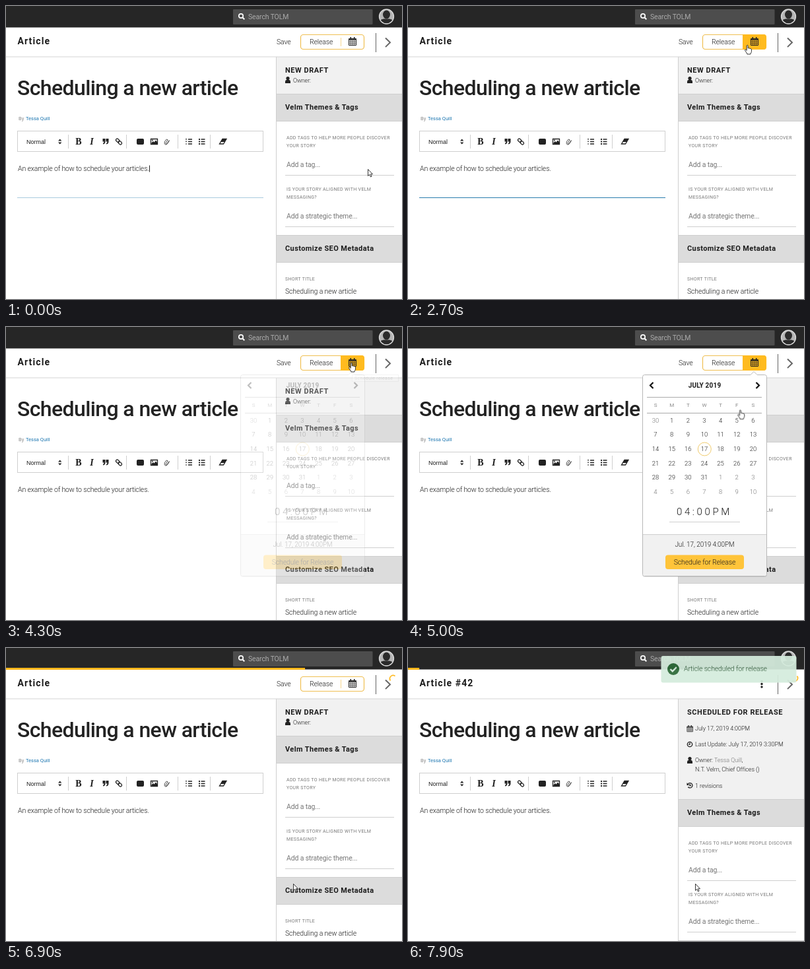
An HTML page that plays this animation: 600 px wide and 444 px high, repeating every 8 s.

```html
<!DOCTYPE html>
<html lang="en">
<head>
<meta charset="utf-8">
<title>Scheduling an article</title>
<style>
html, body { margin: 0; width: 100%; height: 100%; overflow: hidden; background: #fff; }
svg { display: block; width: 100%; height: 100%; }
text { font: 300 10.5px Roboto, "Open Sans", sans-serif; letter-spacing: -.145px; fill: #1c1c1c; white-space: pre; }
.title { font-size: 32px; font-weight: 500; letter-spacing: -.62px; fill: #222; }
.page { font-size: 14px; font-weight: 700; letter-spacing: 1.1px; }
.head { font-size: 11px; font-weight: 700; letter-spacing: .4px; }
.state { font-size: 11px; font-weight: 700; letter-spacing: .55px; }
.label { font-size: 7px; font-weight: 400; letter-spacing: .33px; fill: #777; }
.hint { font-weight: 400; fill: #777; }
.meta { font-size: 9px; letter-spacing: -.08px; }
.by { font-size: 7.5px; font-weight: 400; letter-spacing: 0; fill: #888; }
.mid { text-anchor: middle; }
.day { font-size: 9.5px; letter-spacing: 0; fill: #222; }
.out { fill: #777; }
.week { font-size: 8px; font-weight: 400; letter-spacing: 0; fill: #888; }
.month { font-size: 10px; font-weight: 700; letter-spacing: .2px; }
.time { font-size: 15px; letter-spacing: 3.6px; }
.date { font-size: 10px; letter-spacing: -.08px; }
.serif { font: 700 14px "Liberation Serif", serif; letter-spacing: 0; }
.slant { font-style: italic; }
.pick { font: 9px "Liberation Sans", sans-serif; letter-spacing: 0; }
.line { stroke: #cfcfcf; }
.ink { fill: none; stroke: #222; stroke-width: 1.3; }

/* 1% = 80 ms */
.fade { animation: 8s linear infinite; }
.cut { animation: 8s step-end infinite; }
.focus { animation-name: focus; }
.caret { animation-name: caret; }
.hover { animation-name: hover; }
.tip { animation-name: tip; }
.pop { animation-name: pop; }
.go { animation-name: go; }
.bar { animation-name: bar; }
.toast { animation-name: toast; }
.cursor { animation: move 8s ease-in-out infinite; }
.arrow { animation-name: arrow; }
.beam { animation-name: beam; }
.hand { animation-name: hand; }
.saved { animation-name: saved; }
.unsaved { animation-name: unsaved; }
.done { animation-name: done; }
.draft { animation-name: draft; }
.shift { animation-name: shift; }
.busy { animation-name: busy; }
.spin { animation: spin .4s linear infinite; transform-origin: 586px 46px; }

@keyframes focus { 0% { opacity: .4 } 6%, 51.2% { opacity: 1 } 53%, 100% { opacity: 0 } }
@keyframes caret {
  0%, 13.125%, 26.375%, 39.625% { visibility: visible }
  6.5%, 19.75%, 33%, 46.25%, 100% { visibility: hidden }
}
@keyframes hover { 0%, 21.25% { opacity: 0 } 23.75%, 74.4% { opacity: 1 } 76.25%, 100% { opacity: 0 } }
@keyframes tip { 0%, 38.75% { opacity: 0 } 41.25%, 52% { opacity: 1 } 54.2%, 100% { opacity: 0 } }
@keyframes pop { 0%, 52.2% { opacity: 0 } 58.125%, 78.75% { opacity: 1 } 82.5%, 100% { opacity: 0 } }
@keyframes go { 0%, 70% { fill: #ffc43a } 72.5%, 100% { fill: #ffbb1f } }
@keyframes bar {
  0%, 80% { transform: scaleX(0) }
  83.75% { transform: scaleX(.4) }
  87.5% { transform: scaleX(.93) }
  87.6%, 91.25% { transform: scaleX(0) }
  95% { transform: scaleX(.0933) }
  96.8% { transform: scaleX(.15) }
  96.9% { transform: scaleX(0) }
  98.75% { transform: scaleX(.0283) }
  100% { transform: scaleX(.05) }
}
@keyframes toast { 0%, 88.75% { opacity: 0 } 93.75%, 100% { opacity: .93 } }
@keyframes move {
  0%, 2% { transform: translate(548px, 247px) }
  11.5%, 12.5% { transform: translate(46px, 120px); animation-timing-function: ease-in }
  16.25% { transform: translate(276px, 115px); animation-timing-function: linear }
  21.25% { transform: translate(478px, 64px); animation-timing-function: ease-out }
  25%, 35% { transform: translate(514px, 59px) }
  40%, 55% { transform: translate(523px, 54px) }
  61.9% { transform: translate(504px, 123px) }
  70% { transform: translate(440px, 352px) }
  73%, 82% { transform: translate(437px, 355px) }
  82.5%, 100% { transform: translate(435px, 357px) }
}
@keyframes arrow {
  0%, 18%, 82.5%, 100% { visibility: visible }
  7.5%, 21% { visibility: hidden }
}
@keyframes beam { 0%, 18%, 100% { visibility: hidden } 7.5% { visibility: visible } }
@keyframes hand { 0%, 82.5%, 100% { visibility: hidden } 21% { visibility: visible } }
@keyframes saved { 0% { visibility: hidden } 88.75%, 100% { visibility: visible } }
@keyframes unsaved { 0% { visibility: visible } 88.75%, 100% { visibility: hidden } }
@keyframes done { 0% { visibility: hidden } 96.9%, 100% { visibility: visible } }
@keyframes draft { 0% { visibility: visible } 96.9%, 100% { visibility: hidden } }
@keyframes shift { 0% { transform: none } 96.9%, 100% { transform: translateY(96px) } }
@keyframes busy { 0% { visibility: hidden } 80%, 100% { visibility: visible } }
@keyframes spin { to { transform: rotate(360deg) } }
</style>
</head>
<body>
<svg viewBox="0 0 600 444" xmlns="http://www.w3.org/2000/svg">
  <defs>
    <g id="cal" fill="none" stroke="#222">
      <path d="M.5 2.5h11v10H.5z"/>
      <path d="M0 4h12" stroke-width="1.6"/>
      <path d="M1 7.2h10M1 9.9h10M3.3 5v7.500M6 5v7.500M8.700 5v7.500" stroke-width=".7"/>
      <path d="M3.300 0v3.500M8.700 0v3.500" stroke-width="1.600"/>
    </g>
    <g id="user">
      <circle cx="4" cy="2.6" r="2.6"/>
      <path d="M0 10V7.5Q0 5 2 5h4q2 0 2 2.5V10z"/>
    </g>
    <clipPath id="face"><circle cx="576.5" cy="16" r="11"/></clipPath>
  </defs>
  <rect width="600" height="444" fill="#fff"/>

  <!-- main column -->
  <text class="title" x="17" y="134.5">Scheduling a new article</text>
  <text class="by" x="19" y="173">By <tspan x="30" fill="#1b75b0">Tessa Quill</tspan></text>
  <rect x="17.5" y="189.5" width="372" height="31" fill="none" class="line"/>
  <text class="pick" x="31" y="209">Normal</text>
  <path d="M79 204.5l2.7-3 2.7 3zM79 206.5l2.7 3 2.7-3z" fill="#222"/>
  <path class="line" d="M94.5 195v21M182.5 195v21M260.5 195v21M309.5 195v21"/>
  <text class="serif mid" x="110" y="210">B</text>
  <text class="serif slant mid" x="130" y="210">I</text>
  <path d="M146.5 201h4v4q0 4-3.5 4.5v-1.5q1.5-.5 1.5-2.5h-2zM151.5 201h4v4q0 4-3.5 4.5v-1.5q1.5-.5 1.5-2.5h-2z" fill="#222"/>
  <g class="ink" transform="rotate(45 171 205.5)">
    <rect x="165.5" y="203.5" width="6" height="4" rx="2"/>
    <rect x="170.5" y="203.5" width="6" height="4" rx="2"/>
  </g>
  <rect x="198" y="201" width="11" height="9" rx="2" fill="#222"/>
  <path class="ink" d="M219.5 201.5h10v8h-10z"/>
  <path d="M220.5 209v-2l2.5-2 1.5 1.5 2.5-3 2 2.5v3z" fill="#222"/>
  <circle cx="222" cy="203.5" r="1" fill="#222"/>
  <path d="M247.5 204l-4 4.6q-.8.8-1.500 0-.6-.8 0-1.500l3.500-4.100q-1.800-1.800-3.200 0l-1.900 2.400q-1.400 2.400.2 4 1.800 1.200 3.400-.6l3.800-4.500" transform="rotate(-8 244 205.5)" fill="none" stroke="#444" stroke-width=".9"/>
  <path d="M276 202h6M276 205.5h6M276 209h6M295.5 202h6M295.5 205.5h6M295.5 209h6" stroke="#222" stroke-width="1.6"/>
  <path d="M273 200.5v3M272 205.5h2M272 209h2" stroke="#222"/>
  <path d="M292 202h2M292 205.5h2M292 209h2" stroke="#222" stroke-width="2"/>
  <path class="ink" d="M328 201.5h6l-4.5 7.5h-6z"/>
  <path d="M328 201.5h6l-2.7 4.5h-6z" fill="#222"/>
  <text x="18" y="250">An example of how to schedule your articles.</text>
  <path class="cut caret" d="M217.5 241.5v10" stroke="#222"/>
  <path class="fade focus" d="M17 290.5h373" stroke="#2a7cad"/>

  <!-- sidebar -->
  <rect x="410" y="77" width="190" height="367" fill="#f1f1f1"/>
  <g class="cut draft">
    <text class="state" x="423" y="101">NEW DRAFT</text>
    <use href="#user" x="423" y="107" fill="#222"/>
    <text class="meta" x="435" y="115.5">Owner:</text>
  </g>
  <g class="cut done">
    <text class="state" x="423" y="101">SCHEDULED FOR RELEASE</text>
    <use href="#cal" transform="translate(422.5 117) scale(.78)"/>
    <text class="meta" x="435" y="125">July 17, 2019 4:00PM</text>
    <circle class="ink" cx="427" cy="146" r="3.7"/>
    <path class="ink" d="M427 143.5v2.7h-2"/>
    <text class="meta" x="435" y="149">Last Update: July 17, 2019 3:30PM</text>
    <use href="#user" x="423" y="165" fill="#222"/>
    <text class="meta" x="435" y="173">Owner: <tspan fill="#777">Tessa Quill</tspan>,</text>
    <text class="meta" x="435" y="187">N.T. Velm, Chief Offices ()</text>
    <path class="ink" d="M424 206.5a3.7 3.7 0 1 1 .3 4M427 206v2.5h2"/>
    <path d="M422.5 204v4h3.5z" fill="#222"/>
    <text class="meta" x="435" y="211.5">1 revisions</text>
  </g>
  <g class="cut shift">
    <rect x="410" y="133" width="190" height="320" fill="#fff"/>
    <path d="M410 133h190v42H410zM410 347h190v42H410z" fill="#dcdcdc"/>
    <path class="line" d="M410 133.5h190M410 174.5h190M410 347.5h190M410 388.5h190M423 256.5h165M423 334.5h165"/>
    <text class="head" x="423" y="157">Velm Themes &amp; Tags</text>
    <text class="label" x="425" y="202">ADD TAGS TO HELP MORE PEOPLE DISCOVER</text>
    <text class="label" x="425" y="214">YOUR STORY</text>
    <text class="hint" x="425" y="244">Add a tag...</text>
    <text class="label" x="425" y="280">IS YOUR STORY ALIGNED WITH VELM</text>
    <text class="label" x="425" y="292">MESSAGING?</text>
    <text class="hint" x="425" y="322">Add a strategic theme...</text>
    <text class="head" x="423" y="371">Customize SEO Metadata</text>
    <text class="label" x="423" y="416">SHORT TITLE</text>
    <text x="423" y="436">Scheduling a new article</text>
  </g>
  <path class="line" d="M409.5 77v367"/>

  <!-- page header -->
  <rect y="32" width="600" height="45" fill="#fff"/>
  <path d="M0 77h600" stroke="#d4d4d4"/>
  <text class="page" x="17.5" y="58">Article<tspan class="cut saved"> #42</tspan></text>
  <text class="cut unsaved" x="410" y="58">Save</text>
  <g class="cut draft">
    <rect x="446.5" y="43.5" width="96" height="22" rx="4" fill="#fff" stroke="#efbf52" stroke-width="1.2"/>
    <path d="M507.5 48v13" stroke="#f5d68f"/>
    <path class="fade hover" d="M507 43h32q4 0 4 4v15q0 4-4 4h-32z" fill="#ffbb1f"/>
    <text x="460" y="58">Release</text>
    <use href="#cal" x="519" y="47"/>
  </g>
  <g class="cut done" fill="#222">
    <circle cx="536" cy="50.5" r="1.7"/><circle cx="536" cy="54.5" r="1.7"/><circle cx="536" cy="59" r="1.7"/>
  </g>
  <path d="M560.5 41v29" stroke="#666"/>
  <path d="M575 48.5l7 6.8-7 6.8" fill="none" stroke="#666" stroke-width="2"/>

  <!-- top bar -->
  <rect width="600" height="32.5" fill="#262626"/>
  <rect x="344" y="5" width="211.5" height="23" rx="1" fill="#4d4d4d"/>
  <circle cx="356" cy="15" r="3.2" fill="none" stroke="#fff" stroke-width="1.7"/>
  <path d="M358.3 17.3l3 3" stroke="#fff" stroke-width="2"/>
  <text class="hint" x="367" y="19.5" style="fill:#aaa">Search TOLM</text>
  <circle cx="576.5" cy="16" r="11" fill="#b5b5b5"/>
  <g clip-path="url(#face)" fill="#2a2a2a">
    <ellipse cx="576.5" cy="13" rx="5.5" ry="6.5"/>
    <path d="M564 28q0-7 8-8.500h9q8 1.500 8 8.500z"/>
  </g>
  <circle cx="576.5" cy="16" r="11" fill="none" stroke="#ddd" stroke-width="1.3"/>
  <rect class="fade bar" y="30" width="600" height="3" fill="#ffb81c"/>
  <g class="cut busy">
    <path class="spin" d="M589.5 49.5A5 5 0 0 1 582.5 42.5" fill="none" stroke="#ffb81c" stroke-width="1.6"/>
  </g>

  <g class="fade tip">
    <rect x="524.5" y="72.5" width="70" height="10" fill="#fff" stroke="#c4c4c4"/>
    <text class="label" x="528" y="80">Schedule release</text>
  </g>

  <!-- date picker -->
  <g class="fade pop">
    <rect x="355" y="74" width="189" height="305" rx="4" fill="#000" opacity=".1"/>
    <path d="M358.5 72.5H519l5-5 5 5h11.5q3 0 3 3v299q0 3-3 3h-182q-3 0-3-3v-299q0-3 3-3z" fill="#fff" stroke="#b8b8b8"/>
    <path d="M356 315h187v59q0 3-3 3H359q-3 0-3-3z" fill="#f1f1f1"/>
    <path class="line" d="M356 314.5h187M396 295.5h107"/>
    <path d="M371.5 84l-4.5 4.5 4.5 4.5M527.5 84l4.5 4.5-4.5 4.5" fill="none" stroke="#111" stroke-width="2.2"/>
    <text class="month mid" x="449.5" y="92">JULY 2019</text>
    <path d="M362 106.5h174M362 130.5h174" stroke="#aaa"/>
    <circle cx="449.3" cy="185" r="10" fill="none" stroke="#f0cb6c"/>
    <g id="days"></g>
    <text class="time" x="407" y="285">04:00PM</text>
    <text class="date mid" x="449.5" y="332.5">Jul. 17, 2019 4:00PM</text>
    <rect class="fade go" x="390" y="345.5" width="119" height="21.5" rx="4" fill="#ffbb1f"/>
    <text class="mid" x="449.5" y="359.5">Schedule for Release</text>
  </g>

  <g class="fade toast">
    <rect x="383.5" y="12" width="205" height="40.5" rx="3" fill="#d5ecdd"/>
    <circle cx="402" cy="32" r="9" fill="#2c6a38"/>
    <path d="M397.5 32l3.3 3.4 6-6.2" fill="none" stroke="#d5eadc" stroke-width="2.4"/>
    <text x="418" y="35" style="fill:#2f5a38">Article scheduled for release</text>
  </g>

  <g class="cursor">
    <path class="cut arrow" d="M.5.5v10l2.3-2.1 1.6 3.6 1.7-.8-1.6-3.4h3z" fill="#fff" stroke="#222" stroke-width=".9"/>
    <path class="cut beam" d="M-2.5-5.5h2l.5.7.5-.7h2M0-5V5M-2.5 5.5h2l.5-.7.5.7h2" fill="none" stroke="#333"/>
    <path class="cut hand" d="M-.8 1Q.2-.6 1.2 1v4q1-.8 1.8.2 1-.5 1.7.5 1.3-.4 1.8 1v3q-.3 2.3-1.5 3.3v1H-.2v-1L-3.4 8.500q-.5-1.700 1-1.500L-.8 8.500z" fill="#fff" stroke="#222" stroke-width=".9"/>
  </g>
</svg>
<script>
const days = document.getElementById("days");

function cell(str, col, y, cls) {
  const t = document.createElementNS("http://www.w3.org/2000/svg", "text");
  t.setAttribute("class", "mid " + cls);
  t.setAttribute("x", 375 + col * 24.65);
  t.setAttribute("y", y);
  t.textContent = str;
  days.append(t);
}

[..."SMTWTFS"].forEach((d, i) => cell(d, i, 121, "week"));
for (let i = 0; i < 42; i++) {
  const date = new Date(2019, 5, 30 + i);
  const cls = date.getMonth() === 6 ? "day" : "day out";
  cell(date.getDate(), i % 7, 144.5 + Math.floor(i / 7) * 21.7, cls);
}
</script>
</body>
</html>
```
